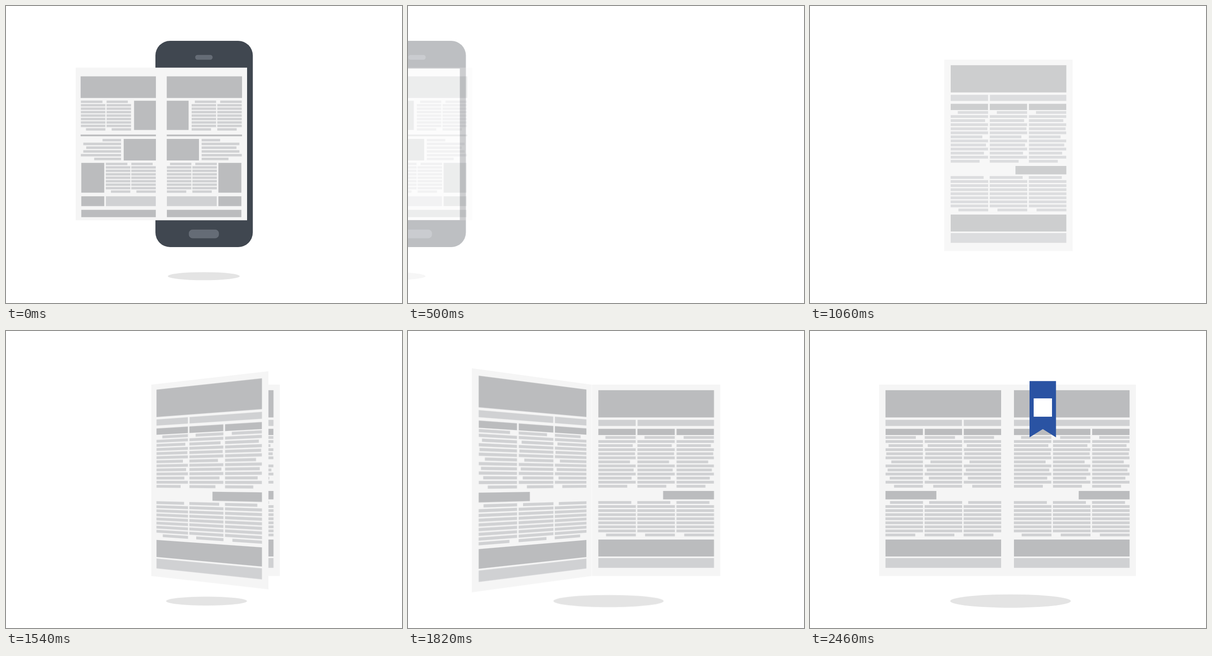
Animation, 864 px wide and 648 px high, one loop 3000 ms. Source, as an HTML page:

```html
<!DOCTYPE html>
<html lang="en">
<head>
<meta charset="utf-8">
<title>Phone to newspaper</title>
<style>
  html, body { margin: 0; width: 100%; height: 100%; overflow: hidden; background: #fff; }
  #stage {
    position: relative; width: 864px; height: 648px; overflow: hidden;
    perspective: 1200px; perspective-origin: 432px 325.7px;
  }
  #stage > svg { position: absolute; left: 0; top: 0; overflow: visible; }
  .paper { fill: #f5f5f5; }
  .dark { fill: #bbbcbe; }
  .light { fill: #d0d1d3; }
  .shadow { fill: #e4e4e4; }
  .body { fill: #404750; }
  .button { fill: #656c76; stroke: #737982; stroke-width: .6; }

  #phone, #spread, #phoneShadow, #page, #flap, #pageShadow, #ribbon * {
    animation-duration: 3s; animation-iteration-count: infinite; animation-timing-function: linear;
  }
  #phone { animation-name: phoneSlide, phoneFade; }
  #phoneShadow { animation-name: shadowSlide, phoneFade; }
  #spread { animation-name: spreadSlide, spreadFade; }
  #stage > #page { left: 431px; top: 117px; animation-name: pageSlide, pageFade; }
  #stage > #flap { left: 431px; top: 117px; transform-origin: 0 50%; animation-name: flapOpen, pageFade; }
  #pageShadow { transform-origin: 437.5px 589.2px; animation-name: shadowGrow, shadowShow; }
  #ribbon * { animation-name: ribbonFade; }

  @keyframes phoneSlide {
    0% { transform: none; }
    8% { transform: translateX(0); animation-timing-function: cubic-bezier(.333, .176, .667, .509); }
    21.333%, 100% { transform: translateX(-756px); }
  }
  @keyframes shadowSlide {
    0%, 8% { transform: translateX(0); }
    21.333%, 100% { transform: translateX(-723px); }
  }
  @keyframes spreadSlide {
    0% { transform: none; }
    8% { transform: translateX(0); animation-timing-function: cubic-bezier(.333, .224, .667, .557); }
    20%, 100% { transform: translateX(-585px); }
  }
  @keyframes phoneFade { 0%, 8% { opacity: 1; } 21.333%, 100% { opacity: 0; } }
  @keyframes spreadFade { 0%, 8% { opacity: 1; } 20%, 100% { opacity: 0; } }

  @keyframes pageFade { 0%, 22.667% { opacity: 0; } 49.333%, 100% { opacity: 1; } }
  @keyframes pageSlide {
    0%, 48.667% { transform: translateX(-138px); }
    64%, 100% { transform: translateX(0); }
  }
  @keyframes flapOpen {
    0%, 48.667% { transform: translateX(-138px) rotateY(0deg); }
    64%, 81.99% { transform: translateX(-1px) rotateY(-180deg); }
    82%, 100% { transform: translateX(0) rotateY(-180deg); }
  }
  @keyframes shadowGrow { 0%, 48.667% { transform: scale(.6); } 64%, 100% { transform: scale(1); } }
  @keyframes shadowShow { 0%, 49.32% { opacity: 0; } 49.33%, 100% { opacity: 1; } }
  @keyframes ribbonFade { 0%, 67.333% { opacity: 0; } 82%, 100% { opacity: 1; } }
</style>
</head>
<body>
<div id="stage">
  <svg width="864" height="648">
    <ellipse id="phoneShadow" class="shadow" cx="431.5" cy="589.5" rx="78.5" ry="8.8"/>
    <ellipse id="pageShadow" class="shadow" cx="437.5" cy="589.2" rx="131.5" ry="14.5"/>
  </svg>
  <svg id="phone" width="864" height="648">
    <rect class="body" x="326" y="76" width="212.5" height="450" rx="32"/>
    <rect class="button" x="413.3" y="107.3" width="37" height="9.4" rx="4.2"/>
    <rect class="button" x="399.3" y="488.3" width="64.8" height="18" rx="7.5"/>
    <rect x="338.3" y="136.5" width="187" height="330.5" fill="#fff"/>
  </svg>
  <svg id="spread" width="864" height="648"></svg>
  <svg id="page" width="280" height="417"></svg>
  <svg id="flap" width="280" height="417"></svg>
  <svg id="ribbon" width="864" height="648">
    <path d="M479 109.3H536.7V232L508 214L479 232Z" fill="#2a53a3"/>
    <rect x="488" y="147" width="40" height="40" fill="#fff"/>
  </svg>
</div>
<script>
  const rect = (kind, x, y, w, h) =>
    `<rect class="${kind}" x="${x}" y="${y}" width="${w}" height="${h}"/>`;

  // Each row is [indent, width]; rows are evenly spaced.
  const lines = (x, y, step, h, rows) =>
    rows.map(([indent, w], i) => rect('light', x + indent, y + i * step, w, h)).join('');

  const full = (n, w) => Array(n).fill([0, w]);

  function newspaperPage() {
    const upper = [66, 81.5, 75, 81.5, 80, 81.5, 69, 81.5, 77, 81.5, 72.5, 81.5, 63]
      .map((w, i) => [i ? 0 : 15.5, w]);
    const lower = [[0, 72], ...full(7, 82), [17, 65]];
    const columns = [14, 99.2, 184.6].map(x =>
      rect('dark', x, 96.4, 81.5, 13.6) +
      lines(x, 112.3, 8.87, 6, upper) +
      lines(x - .2, 254.1, 8.87, 6, lower)).join('');
    return rect('paper', 0, 0, 280, 417.5) +
      rect('dark', 14, 12.2, 252.3, 59.4) +
      rect('light', 14, 76.8, 81.5, 13.4) +
      rect('light', 99.5, 76.8, 166.8, 13.4) +
      columns +
      rect('dark', 155.3, 232, 111, 18.4) +
      rect('dark', 14, 338, 252.3, 37) +
      rect('light', 14, 378.4, 252.3, 21.3);
  }

  function phoneHalf() {
    const upper = indent => [[indent, 53.4 - indent], ...full(7, 53.4), [0, 42.3]];
    return rect('dark', 350.7, 153.5, 164.3, 47.2) +
      rect('dark', 350.7, 206.7, 47.7, 63.8) +
      lines(405, 206.4, 7.52, 5.2, upper(7)) +
      lines(461, 206.4, 7.52, 5.2, upper(6.3)) +
      rect('dark', 350.7, 280.5, 164.3, 3.7) +
      rect('dark', 350.7, 290, 70.3, 47) +
      lines(426.8, 290, 8.2, 5.4, [40.4, 82.4, 76, 82.4, 87.7, 58.6].map(w => [0, w])) +
      lines(351, 342, 7.54, 5.2, upper(6.8)) +
      lines(406.6, 342, 7.54, 5.2, upper(6.4)) +
      rect('dark', 463.4, 342.3, 50.1, 65) +
      rect('light', 351, 415.2, 108.8, 21.4) +
      rect('dark', 463.4, 415.2, 50.1, 21.4) +
      rect('dark', 351, 444.7, 162.5, 16);
  }

  const fill = (id, markup) => document.getElementById(id).innerHTML = markup;
  fill('page', newspaperPage());
  fill('flap', newspaperPage());
  fill('spread', rect('paper', 152, 134.5, 374, 333) + phoneHalf() +
    `<g transform="translate(677.8) scale(-1 1)">${phoneHalf()}</g>`);
</script>
</body>
</html>
```
